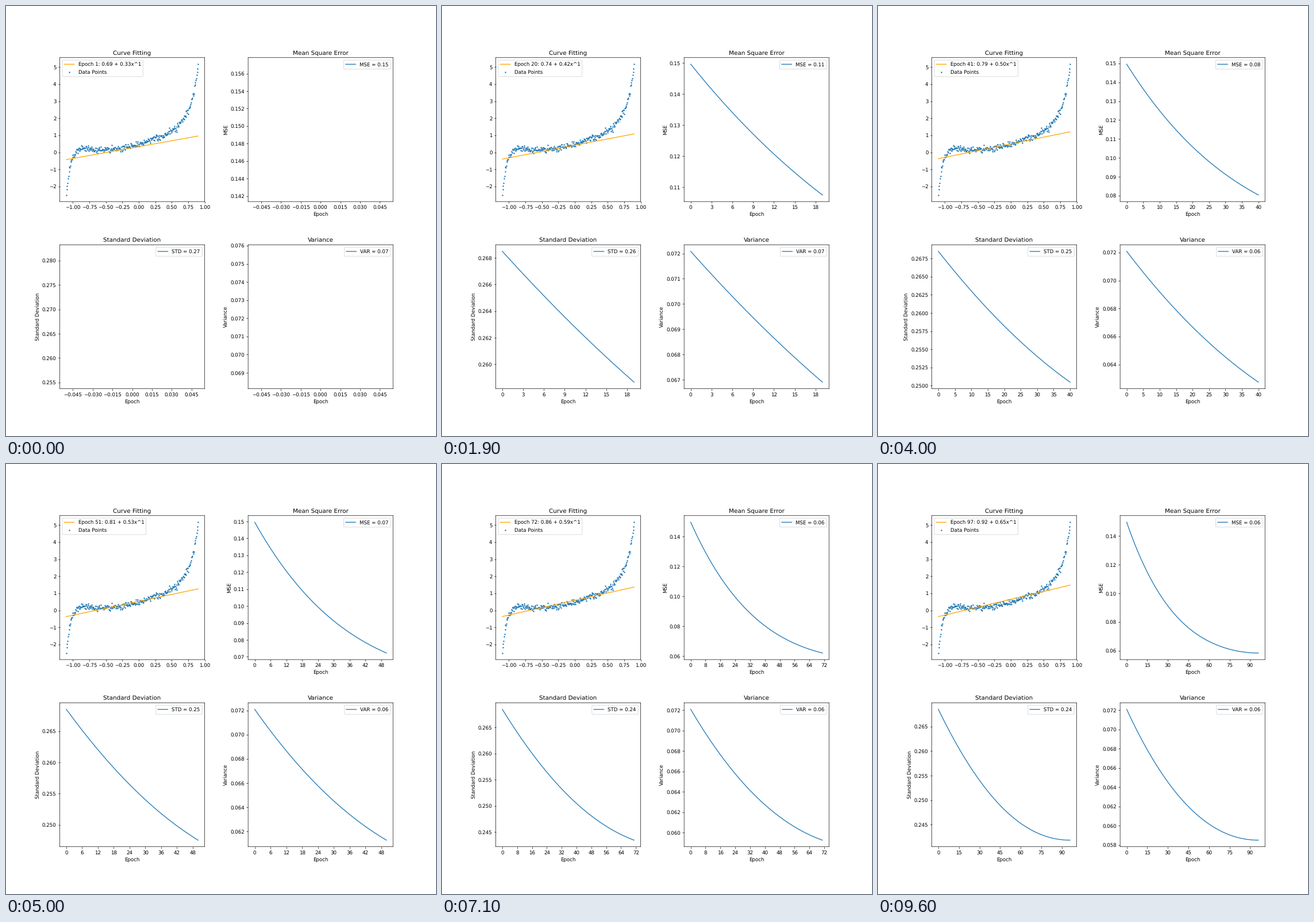
These frames come from a looping animation (748 px wide and 748 px high, 9700 ms). A matplotlib script:

```python
import numpy as np
import matplotlib.pyplot as plt
from matplotlib.animation import FuncAnimation
from matplotlib.ticker import MaxNLocator

EPOCHS = 97
plt.rcParams.update({"path.snap": False, "text.hinting": "none"})

# Training history, as smooth functions of the epoch index
n = np.arange(EPOCHS)
u = 1 - n / (EPOCHS - 1)
mse = 0.0584 + u**2 * (0.0557 - 0.0139 * u + 0.0494 * u**2)
std = 0.24185 + u**2 * (0.02211 + 0.00703 * u - 0.0025 * u**2)
var = std**2
slope = 0.692 + 0.0024 * n
bias = 0.3345 + 0.568 * (1 - np.exp(-n / 120))


def bell(x, center, width):
    return np.exp(-((x - center) / width) ** 2)


def trend(x):
    rise = 0.724 / (1.04 - x)
    drop = 2.75 * np.exp(-(x + 1.1) / 0.058)
    return rise - drop - 0.3 * bell(x, -0.45, 0.65) + 0.15 * bell(x, -0.9, 0.12)


rng = np.random.default_rng(7)
x = np.linspace(-1.1, 0.9, 300)
y = trend(x) + rng.normal(0, 0.1, x.size)

fig, axes = plt.subplots(2, 2, figsize=(12, 12), dpi=748 / 12)
fig.subplots_adjust(left=0.125, right=0.9, bottom=0.11, top=0.88,
                    wspace=0.3, hspace=0.3)

fit_ax = axes[0, 0]
fit_ax.set_title("Curve Fitting")
fit_line, = fit_ax.plot(x, x, color="orange", label="Epoch")
fit_ax.scatter(x, y, s=3, color="tab:blue", label="Data Points")
fit_ax.set_xlim(-1.2, 1.0)
fit_ax.set_ylim(-2.883, 5.553)
fit_label = fit_ax.legend(loc="upper left").get_texts()[0]


def metric_panel(ax, title, ylabel, tag, values):
    ax.set_title(title)
    ax.set_xlabel("Epoch")
    ax.set_ylabel(ylabel)
    ax.xaxis.set_major_locator(MaxNLocator(integer=True))
    line, = ax.plot([], [], label=tag)
    label = ax.legend(loc="upper right").get_texts()[0]
    return ax, line, label, tag, values


panels = [
    metric_panel(axes[0, 1], "Mean Square Error", "MSE", "MSE", mse),
    metric_panel(axes[1, 0], "Standard Deviation", "Standard Deviation",
                 "STD", std),
    metric_panel(axes[1, 1], "Variance", "Variance", "VAR", var),
]


def update(i):
    fit_line.set_ydata(slope[i] * x + bias[i])
    fit_label.set_text(f"Epoch {i + 1}: {slope[i]:.2f} + {bias[i]:.2f}x^1")
    for ax, line, label, tag, values in panels:
        line.set_data(n[:i + 1], values[:i + 1])
        label.set_text(f"{tag} = {round(float(values[i]), 2)}")
        ax.relim()
        ax.autoscale(True)
        ax.autoscale_view()


anim = FuncAnimation(fig, update, frames=EPOCHS, interval=100,
                     init_func=lambda: None, repeat=True)
plt.show()
```
